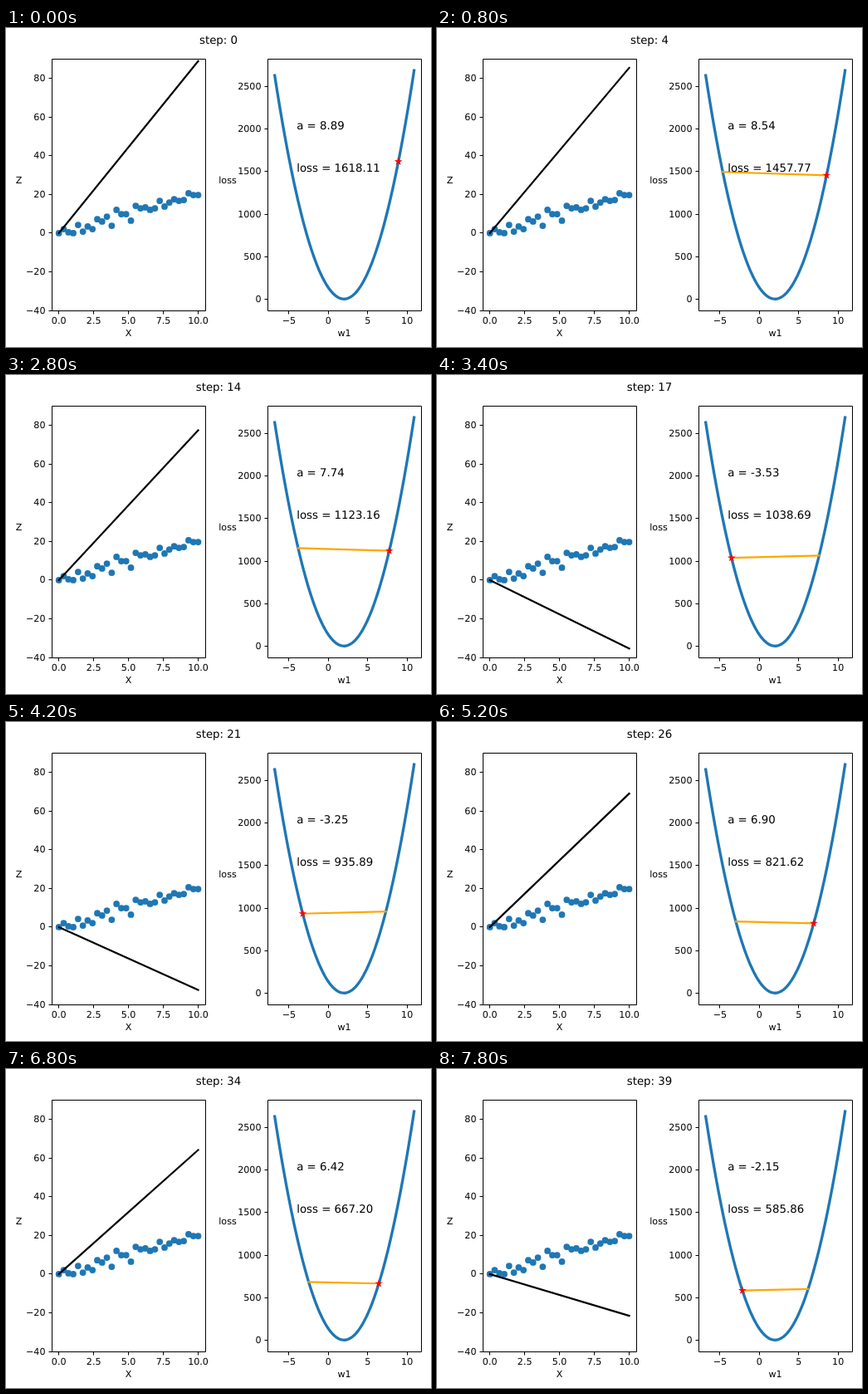
Animation, 512 px wide and 384 px high, one loop 8000 ms. Source, as an HTML page:

```html
<!DOCTYPE html>
<html lang="en">
<head>
<meta charset="utf-8">
<title>Gradient descent</title>
<style>
  html, body { margin: 0; width: 100%; height: 100%; overflow: hidden; background: #fff; }
  svg { display: block; width: 512px; height: 384px; }
  text { font: 11.11px "DejaVu Sans", sans-serif; text-rendering: geometricPrecision; white-space: pre; }
  .big { font-size: 13.33px; }
  .mid { text-anchor: middle; }
  .end { text-anchor: end; }
  .axis { fill: none; stroke: #000; stroke-width: 1; }
  .line { fill: none; stroke-width: 2.22; stroke-linecap: square; }
</style>
</head>
<body>
<svg viewBox="0 0 512 384">
  <defs>
    <clipPath id="leftBox"><rect x="55.3" y="37.4" width="184.7" height="302.8"/></clipPath>
  </defs>
  <g id="dots" fill="#1f77b4"></g>
  <path id="fit" class="line" stroke="#000" clip-path="url(#leftBox)"/>
  <path id="curve" class="line" stroke="#1f77b4" style="stroke-width:3.33"/>
  <path id="jump" class="line" stroke="#ffa500"/>
  <path id="star" fill="#f00" stroke="#f00" stroke-width="1.11"/>
  <g id="axes"></g>
  <text id="title" class="big mid" x="256" y="19"></text>
  <text id="slopeText" class="big" x="350.2" y="122"></text>
  <text id="lossText" class="big" x="350.2" y="173"></text>
</svg>
<script>
const $ = id => document.getElementById(id);
const STEP_MS = 200, STEPS = 40;

// Least-squares loss for z = a * x with x = linspace(0, 10, 30)
const best = 1.992, floorLoss = 3.48, curvature = 33.908046;
const startOffset = 6.900573, learningRate = 0.0293;
const factor = 1 - 2 * curvature * learningRate;
const slopeAt = n => best + startOffset * factor ** n;
const loss = a => curvature * (a - best) ** 2 + floorLoss;

// Data to stage coordinates
const left = { x: v => 63.7 + 16.78 * v, y: v => 246.9 - 2.329 * v };
const right = { x: v => 388.3 + 9.488 * v, y: v => 326.6 - 0.10246 * v };
const at = (plot, x, y) => plot.x(x).toFixed(2) + " " + plot.y(y).toFixed(2);
const snap = v => Math.floor(v) + 0.5;

function add(parent, tag, attrs, text = "") {
  const el = document.createElementNS("http://www.w3.org/2000/svg", tag);
  for (const key in attrs) el.setAttribute(key, attrs[key]);
  el.textContent = text;
  parent.append(el);
}

function label(text, x, y, cls = "mid") {
  add($("axes"), "text", { x, y, class: cls }, text.replace("-", "\u2212"));
}

function drawAxes(plot, x0, x1, xTicks, yTicks, digits) {
  const top = 37.5, bottom = 340.5;
  let d = `M${x0} ${top}H${x1}V${bottom}H${x0}Z`;
  for (const v of xTicks) {
    d += `M${snap(plot.x(v))} ${bottom}v4`;
    label(v.toFixed(digits), plot.x(v), 356);
  }
  for (const v of yTicks) {
    const y = snap(plot.y(v));
    d += `M${x0} ${y}h-4`;
    label(String(v), x0 - 8, y + 3.9, "end");
  }
  add($("axes"), "path", { d, class: "axis" });
}

drawAxes(left, 55.5, 240.5, [0, 2.5, 5, 7.5, 10], [-40, -20, 0, 20, 40, 60, 80], 1);
drawAxes(right, 315.5, 500.5, [-5, 0, 5, 10], [0, 500, 1000, 1500, 2000, 2500], 0);
label("X", 147.6, 371);
label("w1", 407.6, 371);
label("Z", 15.6, 187);
label("loss", 267, 187);

const samples = [0, 2.1, .4, 0, 4.2, .8, 3.4, 2.1, 7.2, 6, 8.5, 3.8, 12, 9.8, 9.8,
  6.4, 14.1, 12.8, 13.3, 12, 12.8, 16.7, 13.7, 15.8, 17.5, 16.7, 17.1, 20.6, 19.7, 19.7];
samples.forEach((z, i) =>
  add($("dots"), "circle", { cx: left.x(i * 10 / 29), cy: left.y(z), r: 3.88 }));

const from = -6.81, to = 10.89, segments = 100;
$("curve").setAttribute("d", "M" + Array.from({ length: segments + 1 }, (_, i) => {
  const w = from + (to - from) * i / segments;
  return at(right, w, loss(w));
}).join("L"));

$("star").setAttribute("d", "M" + Array.from({ length: 10 }, (_, i) => {
  const r = i % 2 ? 1.273 : 3.333, angle = i * Math.PI / 5;
  return `${r * Math.sin(angle)} ${-r * Math.cos(angle)}`;
}).join("L") + "Z");

function show(n) {
  const a = slopeAt(n), prev = slopeAt(n - 1);
  const point = at(right, a, loss(a));
  $("fit").setAttribute("d", `M${at(left, 0, 0)}L${at(left, 10, 10 * a)}`);
  $("jump").setAttribute("d", n ? `M${at(right, prev, loss(prev))}L${point}` : "");
  $("star").setAttribute("transform", `translate(${point})`);
  $("title").textContent = "step: " + n;
  $("slopeText").textContent = "a = " + a.toFixed(2);
  $("lossText").textContent = "loss = " + loss(a).toFixed(2);
}

const start = performance.now();
let shown = -1;
function tick() {
  const n = Math.floor((performance.now() - start) / STEP_MS) % STEPS;
  if (n !== shown) show(shown = n);
  requestAnimationFrame(tick);
}
tick();
</script>
</body>
</html>
```
